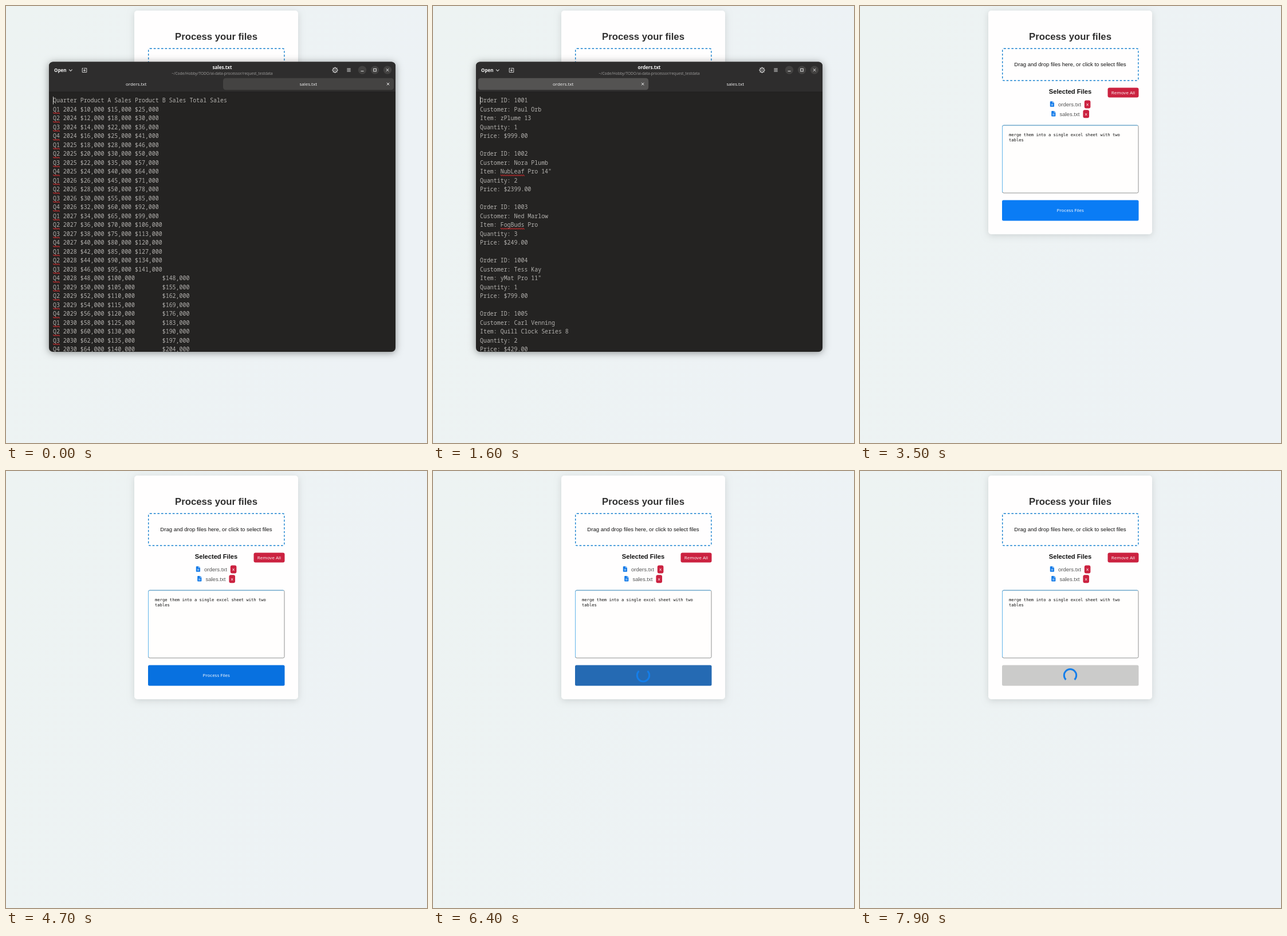
An HTML page with a canvas for the animation above (8000 ms loop, 735 by 762 pixels).

```html
<!DOCTYPE html>
<html lang="en">
<head>
<meta charset="utf-8">
<title>Process your files</title>
<style>
  html, body { margin: 0; width: 100%; height: 100%; overflow: hidden; background: #edf2f3; }
  canvas { display: block; width: 735px; height: 762px; }
</style>
</head>
<body>
<canvas id="stage"></canvas>
<script>
const W = 735, H = 762, LOOP = 8000, TICK = 100;
const SANS = '"Liberation Sans", Arial, sans-serif';
const UI = '"Noto Sans", "Open Sans", sans-serif';
const MONO = '"DejaVu Sans Mono", monospace';
const EDITOR = '"Noto Sans Mono", monospace';

// Moments on the timeline, in ms
const SWITCH_TAB = 900, LEAVE_TAB = 2900, CLOSE_EDITOR = 3500;
const HOVER_BUTTON = 4650, PRESS_BUTTON = 6375, SPIN_START = 6400;

const canvas = document.getElementById('stage');
const ratio = window.devicePixelRatio || 1;
canvas.width = W * ratio;
canvas.height = H * ratio;
const c = canvas.getContext('2d');

const ramp = (t, start, length) => {
  const p = Math.min(1, Math.max(0, (t - start) / length));
  return 1 - (1 - p) ** 2;
};
const mix = (a, b, p) => `rgb(${a.map((v, i) => Math.round(v + (b[i] - v) * p))})`;

function text(str, x, y, size, family, color, align = 'left', weight = 'normal') {
  c.font = `${weight} ${size}px ${family}`;
  c.textAlign = align;
  c.fillStyle = color;
  c.fillText(str, x, y);
}

function roundPath(x, y, w, h, r) {
  c.beginPath();
  c.roundRect(x, y, w, h, r);
}

function box(x, y, w, h, r, color) {
  roundPath(x, y, w, h, r);
  c.fillStyle = color;
  c.fill();
}

function line(points, color, width = 1) {
  c.beginPath();
  points.forEach(([x, y], i) => i ? c.lineTo(x, y) : c.moveTo(x, y));
  c.strokeStyle = color;
  c.lineWidth = width;
  c.stroke();
}

function shadowBox(x, y, w, h, r, color, shadow, blur, drop) {
  c.save();
  c.shadowColor = shadow;
  c.shadowBlur = blur * ratio;
  c.shadowOffsetY = drop * ratio;
  box(x, y, w, h, r, color);
  c.restore();
}

function cross(x, y, r, color) {
  line([[x - r, y - r], [x + r, y + r]], color);
  line([[x + r, y - r], [x - r, y + r]], color);
}

/* ---------- web page ---------- */

function fileIcon(x, y) {
  c.fillStyle = '#127ae8';
  c.beginPath();
  c.moveTo(x + 1, y);
  c.lineTo(x + 4.4, y);
  c.lineTo(x + 4.4, y + 2.8);
  c.lineTo(x + 7.2, y + 2.8);
  c.lineTo(x + 7.2, y + 8.8);
  c.quadraticCurveTo(x + 7.2, y + 9.6, x + 6.2, y + 9.6);
  c.lineTo(x + 1, y + 9.6);
  c.quadraticCurveTo(x, y + 9.6, x, y + 8.6);
  c.lineTo(x, y + 1);
  c.quadraticCurveTo(x, y, x + 1, y);
  c.fill();
  c.beginPath();
  c.moveTo(x + 5, y);
  c.lineTo(x + 7.2, y + 2.3);
  c.lineTo(x + 5, y + 2.3);
  c.fill();
  line([[x + 1.8, y + 5.2], [x + 5.4, y + 5.2]], '#fff', 0.7);
  line([[x + 1.8, y + 7], [x + 5.4, y + 7]], '#fff', 0.7);
}

function fileRow(name, x, y) {
  fileIcon(x, y - 5);
  text(name, x + 14.2, y + 3.6, 9.56, SANS, '#555');
  const end = x + 14.2 + c.measureText(name).width;
  box(end + 6, y - 6.8, 10.6, 14, 3, '#cb2240');
  text('x', end + 11.3, y + 3.2, 7.96, UI, '#fff', 'center');
}

function promptField() {
  box(248, 207.5, 238.5, 119, 3, '#fffefd');
  c.lineWidth = 1;
  roundPath(248.5, 208, 237.5, 118, 2.5);
  c.strokeStyle = '#8e9090';
  c.stroke();
  c.save();
  c.beginPath();
  c.rect(247, 206, 238, 4);
  c.rect(247, 206, 4, 119);
  c.clip();
  roundPath(248.5, 208, 237.5, 118, 2.5);
  c.strokeStyle = '#62b5ea';
  c.stroke();
  c.restore();
  text('merge them into a single excel sheet with two', 260, 227.4, 7.16, MONO, '#111');
  text('tables', 260, 236, 7.16, MONO, '#111');
}

function submitButton(t) {
  const blue = [10, 124, 245], dark = [5, 87, 175], gray = [203, 203, 202];
  const color = t < PRESS_BUTTON
    ? mix(blue, dark, ramp(t, HOVER_BUTTON, 300))
    : mix(dark, gray, ramp(t, PRESS_BUTTON, 300));
  box(248, 338.5, 238.5, 36, 2.5, color);
  if (t < SPIN_START) {
    text('Process Files', 367.2, 359.2, 7.96, UI, '#f5f8fc', 'center');
    return;
  }
  const turn = (t - SPIN_START) / 1000 * Math.PI * 2;
  c.beginPath();
  c.arc(367, 356.3, 10.7, turn - Math.PI / 4, turn + Math.PI * 1.25);
  c.strokeStyle = '#147eea';
  c.lineWidth = 3;
  c.stroke();
}

function page(t) {
  const sky = c.createLinearGradient(0, 0, W, 180);
  sky.addColorStop(0, '#edf3f2');
  sky.addColorStop(1, '#edf2f5');
  c.fillStyle = sky;
  c.fillRect(0, 0, W, H);

  shadowBox(224, 8, 286, 390, 5, '#fffefe', 'rgba(0,0,0,.13)', 12, 2.4);
  text('Process your files', 367, 58.6, 16.72, SANS, '#303030', 'center', 'bold');

  c.setLineDash([3.6, 3]);
  roundPath(248.7, 74.2, 237.2, 55.8, 2.5);
  c.strokeStyle = '#1681cf';
  c.lineWidth = 1.4;
  c.stroke();
  c.setLineDash([]);
  text('Drag and drop files here, or click to select files', 367, 105.4, 9.56, SANS, '#111', 'center');

  text('Selected Files', 367, 152.7, 11.18, SANS, '#111', 'center', 'bold');
  box(432.5, 142.5, 54, 17, 3, '#cb2240');
  text('Remove All', 459.5, 154.4, 7.96, UI, '#fbeef0', 'center');
  fileRow('orders.txt', 331.8, 171.2);
  fileRow('sales.txt', 334.2, 188);

  promptField();
  submitButton(t);
}

/* ---------- text editor ---------- */

const COL = 5.96, ROW = 15.5, LEFT = 82, TOP = 164.5;
const usd = k => `$${k},000`;

const sales = ['Quarter\tProduct A Sales\tProduct B Sales\tTotal Sales'];
const firstB = [15, 18, 22, 25, 28];
for (let i = 0; i < 28; i++) {
  const a = 10 + 2 * i;
  const b = i < 5 ? firstB[i] : 5 + 5 * i;
  sales.push([`Q${i % 4 + 1} ${2024 + (i >> 2)}`, usd(a), usd(b), usd(a + b)].join('\t'));
}

const orders = [
  ['Paul Orb', 'zPlume 13', 1, 999],
  ['Nora Plumb', 'NubLeaf Pro 14"', 2, 2399],
  ['Ned Marlow', 'FogBuds Pro', 3, 249],
  ['Tess Kay', 'yMat Pro 11"', 1, 799],
  ['Carl Venning', 'Quill Clock Series 8', 2, 429]
].flatMap(([who, item, count, price], i) => [
  `Order ID: ${1001 + i}`, `Customer: ${who}`, `Item: ${item}`,
  `Quantity: ${count}`, `Price: $${price}.00`, ''
]);

const misspelt = /^Q\d|NubLeaf|FogBuds/;

function squiggle(x, y, width) {
  c.fillStyle = '#d32d2f';
  for (let d = 0; d < width; d += 3) {
    c.fillRect(x + d, y - 0.3, 1.6, 1.4);
    c.fillRect(x + d + 1.5, y + 1, 1.5, 1.3);
  }
}

function documentText(lines) {
  lines.forEach((str, row) => {
    const y = TOP + row * ROW;
    let col = 0;
    for (const cell of str.split('\t')) {
      text(cell, LEFT + col * COL, y + 3.6, COL / 0.6, EDITOR, '#b3b1ae');
      col = (Math.floor((col + cell.length) / 8) + 1) * 8;
    }
    const hit = str.match(misspelt);
    if (hit) squiggle(LEFT + hit.index * COL, y + 5.8, hit[0].length * COL);
  });
}

function gear(x, y) {
  c.strokeStyle = '#d4d4d4';
  c.lineWidth = 1.2;
  c.beginPath();
  c.arc(x, y, 3.6, 0, 7);
  c.stroke();
  c.lineWidth = 1.5;
  for (let i = 0; i < 8; i++) {
    const s = Math.sin(i * Math.PI / 4), k = Math.cos(i * Math.PI / 4);
    line([[x + s * 3.7, y + k * 3.7], [x + s * 5.2, y + k * 5.2]], '#d4d4d4', 1.5);
  }
  c.beginPath();
  c.arc(x, y, 1.2, 0, 7);
  c.lineWidth = 0.8;
  c.stroke();
}

function headerBar(title) {
  const ink = '#e4e4e4';
  text('Open', 84, 114.8, 8.05, UI, '#f2f2f2', 'left', 'bold');
  line([[110, 110.7], [112.8, 113.5], [115.6, 110.7]], '#cfcfcf', 1.1);

  line([[135, 108.5], [133.2, 108.5], [133.2, 115.6], [140.8, 115.6], [140.8, 108.5], [136, 108.5]], '#d4d4d4');
  line([[137, 110], [137, 114.2]], ink);
  line([[134.9, 112.1], [139.1, 112.1]], ink);

  text(title, 377.4, 110.2, 8.05, UI, '#f4f4f4', 'center', 'bold');
  text('~/Code/Hobby/TODO/ai-data-processor/request_testdata', 377.5, 119.6, 6.58, UI, '#989796', 'center');

  gear(574.5, 111.7);
  for (const y of [109.2, 111.6, 114]) line([[595.3, y], [601.7, y]], ink);
  for (const x of [622, 644, 666]) {
    c.beginPath();
    c.arc(x, 111.6, 7.2, 0, 7);
    c.fillStyle = '#434241';
    c.fill();
  }
  line([[619.5, 113.6], [624.5, 113.6]], ink);
  c.strokeRect(641.7, 109.3, 4.6, 4.6);
  cross(666, 111.6, 2.3, ink);
}

function tab(name, x, width, active, hover) {
  if (active > 0) {
    c.globalAlpha = active;
    box(x, 125.8, width, 20.4, 4.5, mix([68, 67, 66], [84, 83, 82], hover));
    cross(x + width - 10, 136, 2.2, '#f0f0f0');
    c.globalAlpha = 1;
  }
  text(name, x + width / 2 - 0.3, 138.8, 7.95, UI, '#ececec', 'center');
}

function editor(t) {
  const onOrders = t >= SWITCH_TAB;
  const swap = ramp(t, SWITCH_TAB - 50, 200);
  const hover = 1 - ramp(t, LEAVE_TAB, 200);

  shadowBox(75, 97.5, 605, 505.5, 7, '#242322', 'rgba(0,0,0,.42)', 13, 1.5);
  c.save();
  roundPath(75, 97.5, 605, 505.5, 7);
  c.clip();
  c.fillStyle = '#2e2d2d';
  c.fillRect(75, 97, 605, 53);
  c.fillStyle = '#1f1e1e';
  c.fillRect(75, 149.5, 605, 1);
  headerBar(onOrders ? 'orders.txt' : 'sales.txt');
  tab('orders.txt', 78.8, 297.4, swap, hover);
  tab('sales.txt', 379, 298, 1 - swap, 0);
  documentText(onOrders ? orders : sales);

  const blink = (t + 500) % 1200;
  if (blink >= 400) {
    c.fillStyle = '#d0cfcd';
    c.fillRect(82, 158, 1, 13.5);
  }
  c.restore();
}

function draw(t) {
  c.setTransform(ratio, 0, 0, ratio, 0, 0);
  page(t);
  if (t < CLOSE_EDITOR) editor(t);
}

const start = performance.now();
function frame() {
  const t = (performance.now() - start) % LOOP;
  draw(Math.floor(t / TICK) * TICK);
  requestAnimationFrame(frame);
}
frame();
</script>
</body>
</html>
```
